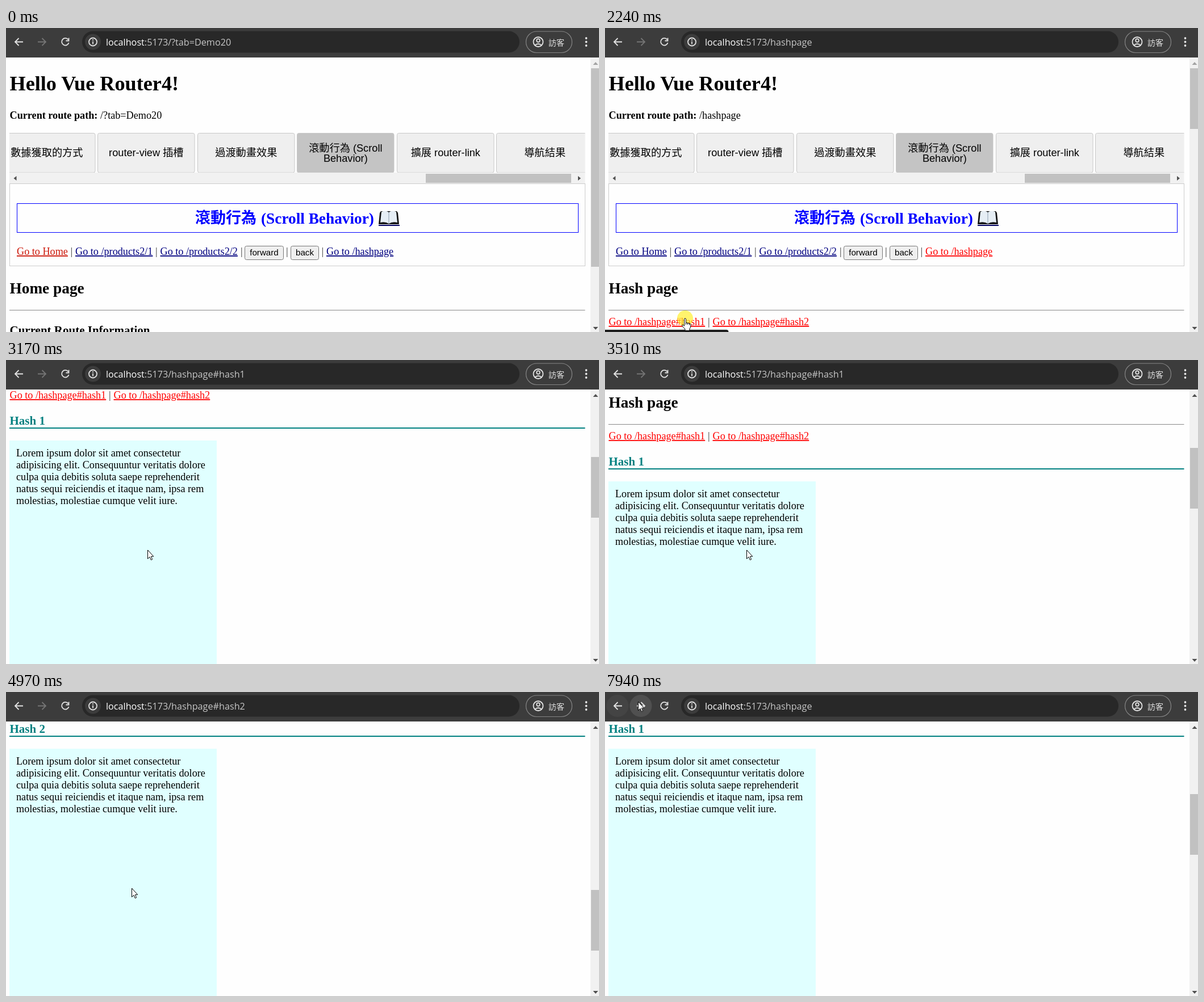
These frames come from a looping animation (1044 by 536 pixels, 8 s). An HTML page:

```html
<!DOCTYPE html>
<html lang="zh-Hant">
<head>
<meta charset="utf-8">
<style>
  html, body { margin: 0; width: 100%; height: 100%; overflow: hidden; background: #fff; }
  svg { display: block; width: 100vw; height: 100vh; }
  .page { font: 18.2px "Liberation Serif", serif; }
  .b { font-weight: bold; }
  .h2 { font-weight: bold; font-size: 27.3px; }
  .h3 { font-weight: bold; font-size: 21px; }
  .cjk { font-family: "Noto Sans CJK TC", "Noto Sans CJK", sans-serif; }
  .tab { font: 18.2px "Liberation Sans", "Noto Sans CJK TC", "Noto Sans CJK", sans-serif; text-anchor: middle; }
  .button { font: 15.2px "Liberation Sans", sans-serif; text-anchor: middle; }
  .link { fill: #000080; text-decoration: underline; }
  .red { fill: #f00; }
  .ui { font-family: "Open Sans", "Noto Sans", sans-serif; }
  .icon { fill: none; stroke: #e3e3e3; stroke-width: 1.8; }
</style>
</head>
<body>
<svg viewBox="0 0 1044 536" preserveAspectRatio="none">
  <defs>
    <clipPath id="tabClip"><rect x="6" y="180" width="1013.5" height="80"/></clipPath>
    <g id="section">
      <rect x="6" y="575" width="1013.5" height="2" fill="#008080"/>
      <rect x="6" y="598" width="365" height="684" fill="#e0ffff"/>
      <text x="18" y="626">Lorem ipsum dolor sit amet consectetur</text>
      <text x="18" y="647">adipisicing elit. Consequuntur veritatis dolore</text>
      <text x="18" y="668">culpa quia debitis soluta saepe reprehenderit</text>
      <text x="18" y="689">natus sequi reiciendis et itaque nam, ipsa rem</text>
      <text x="18" y="710">molestias, molestiae cumque velit iure.</text>
    </g>
  </defs>
  <rect width="1044" height="536" fill="#fefefe"/>

  <g class="page" id="page">
    <text class="b" x="6.5" y="110" style="font-size:36.2px">Hello Vue Router4!</text>
    <text class="b" x="6.5" y="160">Current route path:</text>
    <text id="path" x="166" y="160"></text>

    <g id="tabs" clip-path="url(#tabClip)"></g>

    <rect x="6" y="255" width="1013.5" height="19" fill="#f1f1f1"/>
    <rect x="739" y="257" width="256" height="16" fill="#c1c1c1"/>
    <path d="M18.5 261v8l-5-4zM1007 261v8l5-4z" fill="#505050"/>
    <rect x="6.5" y="274.5" width="1013" height="145" fill="none" stroke="#ccc"/>

    <rect x="19.5" y="309.5" width="988" height="51" fill="none" stroke="#00f"/>
    <g class="h2" fill="#00f">
      <text class="cjk" x="333" y="344" style="font-size:27px">滾動行為</text>
      <text x="449" y="345">(Scroll Behavior)</text>
    </g>
    <path d="M658 326l2-3h28l2 3 2 20h-36z" fill="#111"/>
    <path d="M661 324q8-3 13 1 5-4 13-1l2 19q-9-2-15 2-6-4-15-2z" fill="#e6eef5"/>
    <path d="M674 325v20" stroke="#8a9bab"/>
    <rect x="656" y="347" width="37" height="2" fill="#000060"/>

    <text class="link" id="homeLink" x="19" y="400">Go to Home</text>
    <text class="link" x="122" y="400">Go to /products2/1</text>
    <text class="link" x="271.5" y="400">Go to /products2/2</text>
    <text class="link" id="hashLink" x="564" y="400">Go to /hashpage</text>
    <g id="bars" fill="#333"></g>
    <g fill="#efefef" stroke="#767676">
      <rect x="420.5" y="384.5" width="68" height="24" rx="3"/>
      <rect x="501.5" y="384.5" width="49" height="24" rx="3"/>
    </g>
    <text class="button" x="454.5" y="401">forward</text>
    <text class="button" x="526" y="401">back</text>

    <text class="h2" id="title" x="6.5" y="468"></text>
    <rect x="6" y="497" width="1013.5" height="1" fill="#888"/>
    <text class="h3" id="homeView" x="6.5" y="540">Current Route Information</text>
    <g id="hashView">
      <text class="link red" x="6.5" y="524">Go to /hashpage#hash1</text>
      <text x="181" y="524" fill="#333">|</text>
      <text class="link red" x="189.5" y="524">Go to /hashpage#hash2</text>
      <text class="h3" x="6.5" y="570" fill="#008080">Hash 1</text>
      <use href="#section"/>
      <g transform="translate(0 771)">
        <text class="h3" x="6.5" y="570" fill="#008080">Hash 2</text>
        <use href="#section"/>
      </g>
    </g>
  </g>

  <rect x="1029" y="52" width="15" height="484" fill="#f1f1f1"/>
  <rect id="thumb" x="1030" width="14" fill="#c1c1c1"/>
  <path id="upArrow" d="M1033.5 65h9l-4.5-5z"/>
  <path d="M1033.5 527h9l-4.5 5z" fill="#505050"/>

  <rect width="1044" height="52" fill="#3c3c3c"/>
  <circle id="backGlow" cx="22" cy="24.5" r="19.5" fill="#fff"/>
  <circle id="forwardGlow" cx="63" cy="24.5" r="19.5" fill="#fff"/>
  <rect x="134" y="5.5" width="770" height="38" rx="19" fill="#282828"/>
  <circle cx="153" cy="24.5" r="14" fill="#3c3c3c"/>
  <g class="icon">
    <path d="M30 24.5H17M22.5 18l-6.5 6.5 6.5 6.5"/>
    <path id="forwardIcon" d="M56 24.5h13M63.500 18l6.500 6.500-6.500 6.500"/>
    <path d="M109.500 20.500a6.300 6.300 0 1 0 1 5.500M110.500 17.500v5h-5"/>
    <circle cx="153" cy="24.5" r="7"/>
    <path d="M153 23.500v5M153 20v2"/>
    <rect x="915.5" y="6" width="81" height="37.500" rx="18.700" stroke="#858585" stroke-width="1.200"/>
    <circle cx="937" cy="24.500" r="8.500"/>
    <circle cx="937" cy="22" r="2.800"/>
    <path d="M931 30.500q6-5 12 0"/>
  </g>
  <g fill="#e3e3e3">
    <circle cx="1021.500" cy="18" r="1.900"/><circle cx="1021.500" cy="24.500" r="1.900"/><circle cx="1021.500" cy="31" r="1.900"/>
    <text class="cjk" x="955" y="30.500" font-size="14">訪客</text>
  </g>
  <text class="ui" x="176" y="31" font-size="16.200" fill="#fff">localhost<tspan id="url" fill="#c7c7c7"></tspan></text>

  <g id="status">
    <rect id="statusBox" x="-5" y="514" height="40" rx="4" fill="#1f1f1f"/>
    <text class="ui" id="statusText" x="1.500" y="532" font-size="13.850" fill="#c8c8c8"></text>
  </g>

  <g id="pointer">
    <circle id="click" r="14" fill="#ffee1e" fill-opacity=".65"/>
    <g fill="#fff" stroke="#000" stroke-linejoin="round">
      <path id="arrow" d="M.5 0V15.500L4 12.200 6.300 17.600 8.600 16.600 6.400 11.300H10.700Z"/>
      <g id="hand">
        <path d="M-1.500 1.500a1.500 1.500 0 0 1 3 0V7.500l6 1.300q2.800.6 2.600 3.200-.2 4-2.300 7v2.500H0v-2.500L-5 13.500q-.8-1.800.8-2.200 1.200 0 2.700 2z"/>
        <path d="M1.500 7.500v3.500M4.500 8.200v3M7.500 8.800v3" fill="none"/>
      </g>
    </g>
  </g>
</svg>

<script>
const LOOP = 8000;
const $ = id => document.getElementById(id);
const set = (id, attrs) => { for (const k in attrs) $(id).setAttribute(k, attrs[k]); };
const show = (id, on) => set(id, { visibility: on ? 'visible' : 'hidden' });
const write = (id, s) => { if ($(id).textContent !== s) $(id).textContent = s; };
const clamp = (v, a, b) => Math.max(a, Math.min(b, v));
const smooth = p => { p = clamp(p, 0, 1); return p * p * (3 - 2 * p); };
const within = (t, spans) => spans.some(([a, b]) => t >= a && t < b);
// Value of the latest [time, value] entry already reached.
const latest = (t, keys) => keys.filter(k => k[0] <= t).pop()[1];

const tabs = ['數據獲取的方式', 'router-view 插槽', '過渡動畫效果', '', '擴展 router-link', '導航結果'];
$('tabs').innerHTML = tabs.map((label, i) => {
  const x = Math.round(-14.5 + i * 175.5) + .5, mid = x + 85.3;
  const text = label
    ? `<text class="tab" x="${mid}" y="226">${label}</text>`
    : `<text class="tab" x="${mid}" y="217.5">滾動行為 (Scroll</text><text class="tab" x="${mid}" y="236">Behavior)</text>`;
  return `<rect x="${x}" y="185.5" width="170.500" height="69.500" rx="3" fill="${label ? '#efefef' : '#c4c4c4'}" stroke="#c8c8c8"/>${text}`;
}).join('');
$('bars').innerHTML = [113.5, 263, 413, 493, 555.5].map(x => `<text x="${x}" y="400">|</text>`).join('');

// Pointer moves: start, end, number of steps, destination.
const moves = [
  [200, 700, 8, 622, 394],
  [1220, 1780, 9, 141, 512],
  [2630, 3040, 7, 249, 335],
  [3440, 4110, 9, 281, 131],
  [4440, 4441, 2, 275, 126],
  [4770, 4970, 4, 221, 346],
  [5190, 5730, 9, 23, 25],
  [7470, 7940, 7, 58, 17]
];
function pointerAt(t) {
  let x = 690, y = 560;
  for (const [start, end, steps, toX, toY] of moves) {
    if (t < start) break;
    const step = Math.floor((t - start) / (end - start) * (steps - 1) + 1e-6);
    const p = smooth(step / (steps - 1));
    x += (toX - x) * p;
    y += (toY - y) * p;
  }
  return [x, y];
}

function scrollAt(t) {
  if (t >= 3100 && t < 4440) {
    const tick = 3100 + Math.floor((t - 3100) / 70) * 70;
    return 498 - 114 * smooth((tick - 3024) / 356);
  }
  return latest(t, [[0, 0], [2305, 498], [4440, 1269], [6000, 498]]);
}

function draw(t) {
  const home = t < 900;
  const hash = latest(t, [[0, ''], [2305, '#hash1'], [4440, '#hash2'], [6000, '#hash1'], [7130, '']]);
  const route = home ? '/?tab=Demo20' : '/hashpage' + hash;
  write('path', route);
  write('url', ':5173' + route);
  write('title', home ? 'Home page' : 'Hash page');
  show('homeView', home);
  show('hashView', !home);
  $('homeLink').style.fill = home ? '#cc1608' : '';
  $('hashLink').style.fill = home ? '' : '#f00';

  const scroll = scrollAt(t);
  set('page', { transform: `translate(0 ${-Math.round(scroll)})` });
  set('thumb', { y: Math.round(71 + scroll * .219), height: home ? 350 : 107 });
  set('upArrow', { fill: scroll ? '#505050' : '#a3a3a3' });

  const [x, y] = pointerAt(t);
  const hand = within(t, [[620, 1290], [1640, 2305], [4000, 4440]]);
  set('pointer', { transform: `translate(${Math.round(x)} ${Math.round(y)})` });
  show('hand', hand);
  show('arrow', !hand);
  show('click', within(t, [[820, 950], [2240, 2305], [4310, 4440], [5870, 6000], [7130, 7200]]));

  // The status bubble slides down when the pointer comes close.
  const target = latest(t, [[0, ''], [620, '/hashpage'], [1640, '/hashpage#hash1'],
    [2630, ''], [4040, '/hashpage#hash2'], [4840, '']]);
  const width = target.includes('#') ? 217.5 : 171;
  const distance = Math.hypot(Math.max(0, x - width), Math.max(0, 514 - y));
  write('statusText', 'localhost:5173' + target);
  set('statusBox', { width: width + 5 });
  set('status', { transform: `translate(0 ${clamp(20 - distance, 0, 18)})` });
  show('status', target);

  set('backGlow', { opacity: latest(t, [[0, 0], [5660, .1], [5870, .18], [7600, .1], [7740, .04]]) });
  set('forwardGlow', { opacity: latest(t, [[0, 0], [7670, .1]]) });
  set('forwardIcon', { stroke: t < 6000 ? '#757575' : '#e3e3e3' });
}

const begin = performance.now();
function frame() {
  draw((performance.now() - begin) % LOOP);
  requestAnimationFrame(frame);
}
frame();
</script>
</body>
</html>
```
